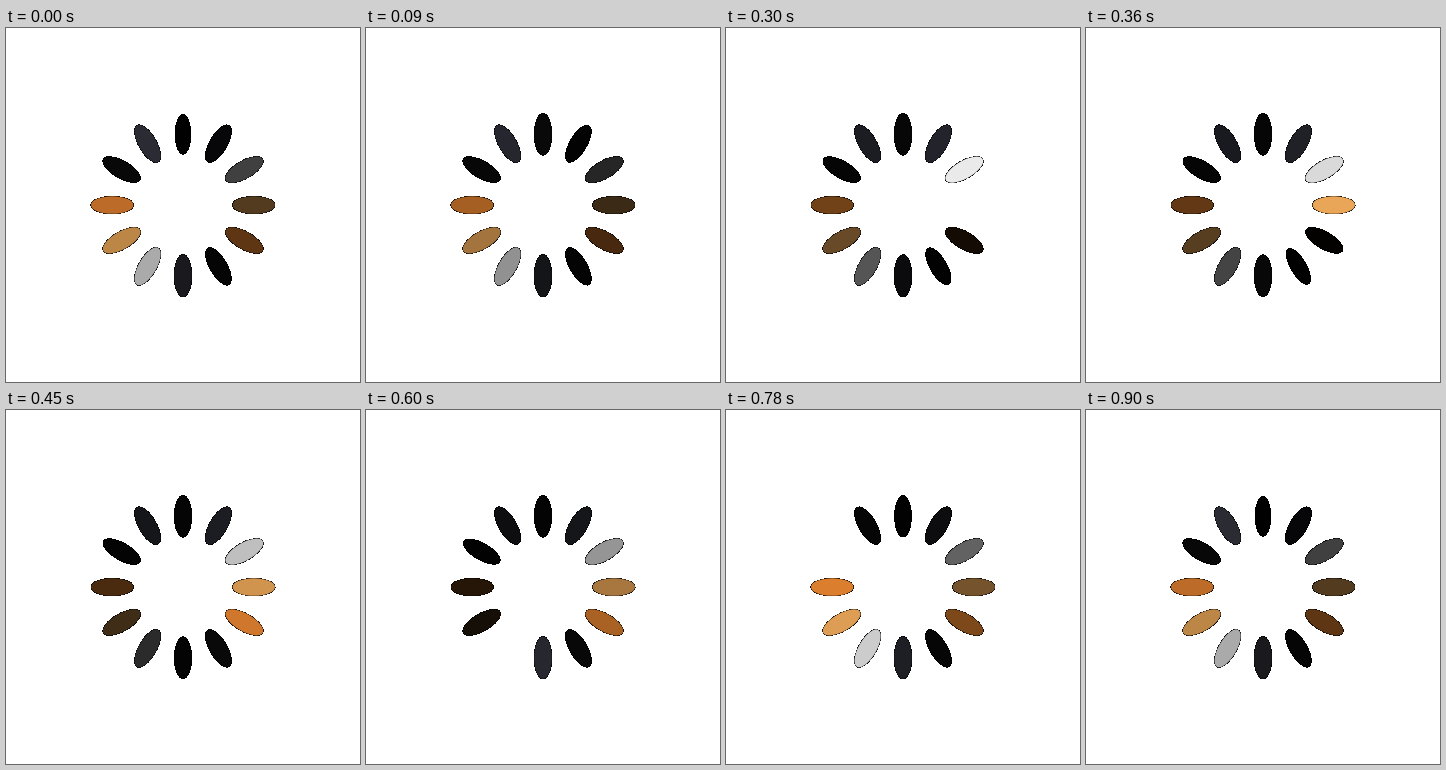
These frames come from a looping animation (354x354 px, 930 ms). An HTML page with a canvas:

```html
<!DOCTYPE html>
<html lang="en">
<head>
<meta charset="utf-8">
<title>Spinner</title>
<style>
  html, body { margin: 0; width: 100%; height: 100%; overflow: hidden; background: #fff; }
  canvas { display: block; }
</style>
</head>
<body>
<canvas id="stage" width="354" height="354"></canvas>
<script>
const SIZE = 354;
const UNIT = SIZE / 100;
const PETALS = 12;
const STEP_MS = 30;
const STEPS = 30;
const PALETTE = [
  [9, 9, 9],
  [42, 43, 51],
  [255, 255, 255],
  [250, 178, 95],
  [226, 130, 48]
];

const ctx = document.getElementById("stage").getContext("2d", { willReadFrequently: true });

// Opacity falls linearly from 1 to 0; phases are kept in whole thousandths.
function opacity(index, step) {
  const offset = Math.floor(1000 * (PETALS - 1 - index) / PETALS);
  const time = Math.floor(1000 * step / STEPS);
  return 1 - (time + offset) % 1000 / 1000;
}

function drawPetal(index, step) {
  const level = opacity(index, step);
  const rgb = PALETTE[index % PALETTE.length].map(c => Math.round(c * level));
  ctx.save();
  ctx.translate(SIZE / 2, SIZE / 2);
  ctx.rotate(index * 2 * Math.PI / PETALS);
  ctx.fillStyle = `rgb(${rgb})`;
  ctx.beginPath();
  ctx.ellipse(0, -20 * UNIT, 2.5 * UNIT, 6 * UNIT, 0, 0, 2 * Math.PI);
  ctx.fill();
  ctx.restore();
}

// Pure black becomes the white page, which leaves hard edges with a dark rim.
function keyOutBlack() {
  const image = ctx.getImageData(0, 0, SIZE, SIZE);
  const px = image.data;
  for (let i = 0; i < px.length; i += 4) {
    if (!(px[i] || px[i + 1] || px[i + 2])) px.fill(255, i, i + 3);
  }
  ctx.putImageData(image, 0, 0);
}

function draw(step) {
  ctx.fillStyle = "#000";
  ctx.fillRect(0, 0, SIZE, SIZE);
  for (let i = 0; i < PETALS; i++) drawPetal(i, step);
  keyOutBlack();
}

let shown = -1;
function tick() {
  const step = Math.floor(performance.now() / STEP_MS) % (STEPS + 1);
  if (step !== shown) draw(shown = step);
  requestAnimationFrame(tick);
}
tick();
</script>
</body>
</html>
```
